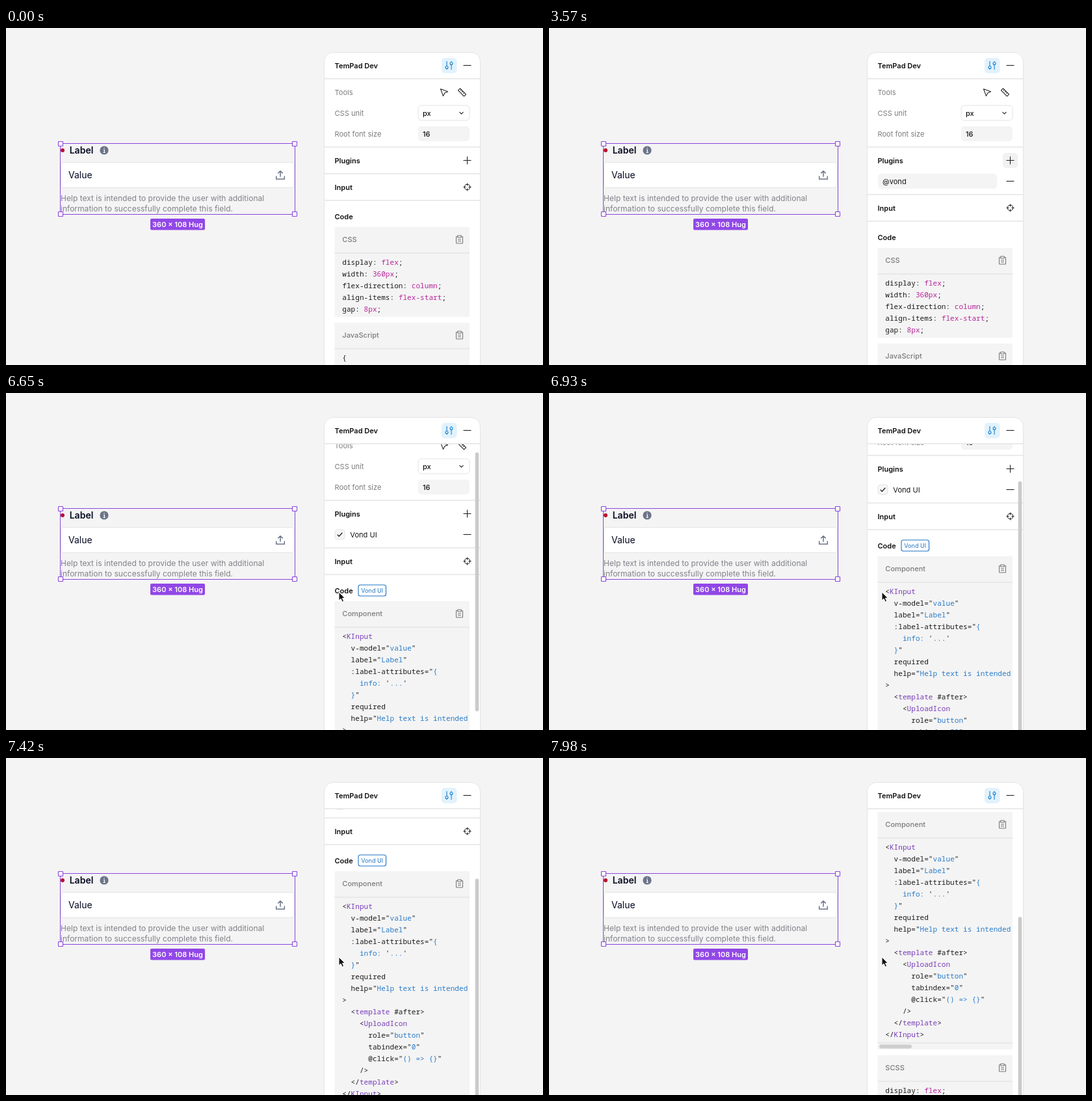
Write an HTML page that moves like this. It is 826 px wide and 518 px high and loops after 8000 ms.

```html
<!DOCTYPE html>
<html lang="en">
<head>
<meta charset="utf-8">
<title>Plugin panel</title>
<style>
html, body { margin: 0; width: 100%; height: 100%; overflow: hidden; background: #f4f4f4; }
svg { display: block; width: 826px; height: 518px; }
text { font: 11px Inter, sans-serif; letter-spacing: .055px; fill: #111; white-space: pre; }
.b { font-weight: 600; letter-spacing: 0; }
.m { font-weight: 500; }
.g { fill: #7b7b7b; }
.code { font: 11px "Roboto Mono", "Noto Sans Mono", monospace; letter-spacing: .055px; fill: #1c1c1c; }
.i { fill: none; stroke: #222; stroke-width: 1.1; stroke-linejoin: round; }
</style>
</head>
<body>
<svg id="stage" viewBox="0 0 826 518" xmlns="http://www.w3.org/2000/svg"></svg>
<script>
const STEP = 70, LOOP = 8000, ROW = 32, PLUGIN = "Vond UI", QUERY = "@vond";
const INKS = { m: "#b7269a", b: "#2b7cc9", p: "#7a3eb8" };

const esc = s => s.replace(/&/g, "&amp;").replace(/</g, "&lt;");
const text = (x, y, s, cls = "", more = "") => `<text x="${x}" y="${y}" class="${cls}" ${more}>${esc(s)}</text>`;
const rect = (x, y, w, h, r, fill, more = "") =>
  `<rect x="${x}" y="${y}" width="${w}" height="${h}" rx="${r}" fill="${fill}" ${more}/>`;
const icon = (x, y, d, more = "") => `<path class="i" transform="translate(${x} ${y})" d="${d}" ${more}/>`;
const rule = (y, x1 = 490, x2 = 729) =>
  `<path d="M${x1} ${y}H${x2}" stroke="#e4e4e4" stroke-width="1.3"/>`;
const minus = y => icon(709.5, y, "M-6 0H6");
const group = (id, body, more = "") => `<g id="${id}" ${more}>${body}</g>`;

// Odd segments between bars are coloured by their first letter.
const codeLine = (y, s) => `<text x="517.3" y="${y}" class="code">` + s.split("|").map((p, i) =>
  i % 2 ? `<tspan fill="${INKS[p[0]]}">${esc(p.slice(1))}</tspan>` : esc(p)).join("") + "</text>";

const CLIP = "M-3 -4.5H-4.2Q-5 -4.5 -5 -3.7V5.2Q-5 6 -4.2 6H4.2Q5 6 5 5.2V-3.7Q5 -4.5 4.2 -4.5H3" +
  "M-2.7 -6H2.7V-3H-2.7ZM-2.5 0H2.5M-2.5 2.8H2.5";

const block = (y, h, title, lines) =>
  rect(505.5, y, 207.5, h, 1, "#f4f4f4") +
  text(517.3, y + 23, title, "m g") +
  icon(697.5, y + 19, CLIP, 'style="stroke:#777"') +
  rule(y + 40, 505.5, 713) +
  `<g clip-path="url(#codeClip)">${lines.map((s, i) => codeLine(y + 57.5 + i * 18, s)).join("")}</g>`;

const css = ["display: |mflex|;", "width: |m360px|;", "flex-direction: |mcolumn|;",
  "align-items: |mflex-start|;", "gap: |m8px|;"];
const markup = ["<|pKInput|", '  v-model="|bvalue|"', '  label="|bLabel|"', '  :label-attributes="|b{|',
  "    |binfo: |'|b...|'", '  |b}|"', "  required",
  '  help="|bHelp text is intended to provide the user|"', ">",
  "  <|ptemplate| #after>", "    <|pUploadIcon|", '      role="|bbutton|"', '      tabindex="|b0|"',
  '      @click="|b() => {}|"', "    />", "  </|ptemplate|>", "</|pKInput|>"];

function canvasSide() {
  const violet = "#8b46dc";
  const handle = (x, y) => rect(x - 3.5, y - 3.5, 7, 7, .5, "#fff", `stroke="${violet}" stroke-width="1.1"`);
  return '<circle cx="87" cy="188" r="3" fill="#b9102f"/>' +
    text(97.7, 193, "Label", "b", 'style="font-size:14px;fill:#060a20"') +
    '<circle cx="151" cy="188" r="6.6" fill="#6c7489"/>' +
    '<path d="M150 187.3h1.3v4M149.6 191.3h3.2M150.4 184.6h1.3" stroke="#fff" stroke-width="1.2" fill="none"/>' +
    rect(84.5, 206.5, 358.5, 39, 4, "#fff", 'stroke="#e1e3e8"') +
    text(96, 231, "Value", "", 'style="font-size:14px;letter-spacing:0;fill:#060a20"') +
    icon(422, 226, "M-6.3 1.5V6.2H6.3V1.5M0 2.8V-6M-3.7 -2.6L0 -6.3L3.7 -2.6", 'style="stroke:#6c7489;stroke-width:1.5"') +
    ["Help text is intended to provide the user with additional",
      "information to successfully complete this field."].map((s, i) =>
      text(84, 266 + i * 16, s, "", 'style="font-size:12px;letter-spacing:.02px;fill:#808289"')).join("") +
    rect(83.5, 177.5, 361, 109, 0, "none", `stroke="${violet}"`) +
    handle(84, 178) + handle(444, 178) + handle(84, 286) + handle(444, 286) +
    rect(222, 293, 84, 17.5, 2, "#9147e6") +
    text(264, 306, "360 × 108 Hug", "b", 'text-anchor="middle" style="fill:#fff"');
}

function settings() {
  return text(505.5, 102.5, "Tools", "g") + text(505.5, 134.5, "CSS unit", "g") +
    text(505.5, 166.5, "Root font size", "g") +
    icon(674, 99, "M-5.5 -5.2L5.6 -1.2L.9 .7L-1.6 5.4Z") +
    icon(701.5, 98.8, "M-3 -6L6 3L3 6L-6 -3ZM-1 -4L-2.6 -2.4M1.2 -1.8L-.4 -.2M3.4 .4L1.8 2") +
    rect(634, 119, 79, 23, 5, "#fff", 'stroke="#e3e3e3"') + text(641, 134.5, "px", "m") +
    icon(700.5, 130.5, "M-3 -1.4L0 1.6L3 -1.4") +
    rect(634, 151, 79, 23, 5, "#f4f4f4") + text(641, 166.5, "16", "m") + rule(183);
}

function plugins() {
  return group("hover", rect(698, 192, 23, 23, 5, "#f1f1f1")) +
    text(505.5, 207.5, "Plugins", "b") + icon(709.5, 203.5, "M-6 0H6M0 -6V6") +
    group("field",
      '<rect id="box" x="506" y="224" width="183.3" height="23" rx="5" fill="#f4f4f4" stroke-width="1.4"/>' +
      text(513, 239.5, "", "", 'id="query"') + rect(0, 229, 1, 13, 0, "#111", 'id="caret"') + minus(235.5)) +
    group("entry",
      rect(506, 228, 15, 15, 4, "#f6f6f6", 'stroke="#e2e2e2"') +
      icon(513.5, 235.5, "M-3.8 .2L-1.2 2.8L3.8 -2.8", 'style="stroke-width:1.3"') +
      text(529.3, 239.5, PLUGIN) + minus(235.5));
}

function lower() {
  return rule(224) + text(505.5, 248.5, "Input", "b") +
    icon(709.5, 244.5, "M-4.2 0A4.2 4.2 0 1 0 4.2 0A4.2 4.2 0 1 0 -4.2 0M-6 0H-2M2 0H6M0 -6V-2M0 2V6") +
    rule(265) + text(505.5, 293.5, "Code", "b") +
    group("plain", block(306, 138, "CSS", css) + block(453, 138, "JavaScript", ["{"])) +
    group("ready",
      rect(542, 281, 42.5, 17, 3, "#fff", 'stroke="#1f74c4" stroke-width="1.1"') +
      text(563.3, 292.8, PLUGIN, "", 'text-anchor="middle" style="font-size:9px;fill:#1f74c4"') +
      block(306, 365, "Component", markup) + rule(661, 505.5, 713) +
      rect(508, 663.5, 50, 6, 3, "#cecece") + block(680, 138, "SCSS", css));
}

const stage = document.getElementById("stage");
stage.innerHTML =
  '<defs><clipPath id="bodyClip"><rect x="489" y="78" width="241" height="440"/></clipPath>' +
  '<clipPath id="codeClip"><rect x="505" y="0" width="208" height="1000"/></clipPath></defs>' +
  rect(0, 0, 826, 518, 0, "#f4f4f4") + canvasSide() +
  rect(489.5, 37.5, 240, 660, 14, "#fff", 'stroke="#e4e4e4"') +
  `<g clip-path="url(#bodyClip)">${group("scroll", settings() + plugins() + group("lower", lower()))}` +
  rect(721.7, 80, 5.6, 398, 2.8, "#cacaca", 'id="thumb"') + "</g>" +
  rule(78) + text(505.5, 61.5, "TemPad Dev", "b") +
  rect(670, 46, 23.5, 23.5, 5, "#e2f2fd") +
  icon(681.5, 57.5, "M-3.5 -6.5V1M-3.5 5V6.5M3.5 -6.5V-5M3.5 -1V6.5" +
    "M-5.5 3A2 2 0 1 0 -1.5 3A2 2 0 1 0 -5.5 3M1.5 -3A2 2 0 1 0 5.5 -3A2 2 0 1 0 1.5 -3", 'style="stroke:#1580cf"') +
  minus(57.5) +
  group("cursor", '<path d="M0 0V13L3 10.2L5.2 15.1L7.5 14.1L5.4 9.3H9.3Z" fill="#111" stroke="#fff" stroke-width="1"/>');

const $ = id => document.getElementById(id);
const el = {};
for (const id of ["hover", "field", "box", "query", "caret", "entry", "lower", "plain", "ready", "scroll", "thumb", "cursor"])
  el[id] = $(id);

const show = (node, on) => node.setAttribute("display", on ? "inline" : "none");
const move = (node, x, y) => node.setAttribute("transform", `translate(${x} ${y})`);
const within = (t, a, b) => t >= a && t < b;

// Smooth curve through [time, value] points, at rest at both ends.
function curve(keys, t) {
  const last = keys.length - 1;
  if (t <= keys[0][0]) return keys[0][1];
  if (t >= keys[last][0]) return keys[last][1];
  const i = keys.findIndex(k => k[0] > t) - 1;
  const slope = n => n <= 0 || n >= last ? 0 :
    (keys[n + 1][1] - keys[n - 1][1]) / (keys[n + 1][0] - keys[n - 1][0]);
  const [t0, a] = keys[i], [t1, b] = keys[i + 1], d = t1 - t0, u = (t - t0) / d;
  const e = u * u * (3 - 2 * u);
  return a + (b - a) * e + d * u * (1 - u) * (slope(i) * (1 - u) - slope(i + 1) * u);
}

const scrollKeys = [[6580, 0], [6650, 18], [6930, 87], [7210, 143], [7420, 164],
  [7560, 200], [7700, 241], [7840, 253], [7980, 255]];
const enterX = [[350, 806], [420, 798], [770, 738], [1050, 716]];
const enterY = [[350, 330], [420, 318], [770, 230], [1050, 204]];
const leaveX = [[5670, 716], [5880, 620], [6090, 484], [6230, 512]];
const leaveY = [[5670, 204], [5880, 262], [6090, 316], [6230, 306]];
const keyTimes = [1680, 2240, 2520, 2730, 2940];

function draw(time) {
  const t = Math.floor(time / STEP) * STEP;
  const open = t >= 1120, loaded = t >= 5250;

  const leaving = t >= 5740;
  const x = curve(leaving ? leaveX : enterX, t), y = curve(leaving ? leaveY : enterY, t);
  show(el.cursor, leaving || within(t, 420, 1680));
  move(el.cursor, x, y);
  show(el.hover, t >= 420 && within(x, 698, 721) && within(y, 192, 215));

  show(el.field, open && !loaded);
  show(el.entry, loaded);
  show(el.plain, !loaded);
  show(el.ready, loaded);
  move(el.lower, 0, open ? ROW : 0);

  el.query.textContent = QUERY.slice(0, keyTimes.filter(k => t >= k).length);
  el.query.style.fill = t >= 3640 ? "#9a9a9a" : "#111";
  el.box.setAttribute("stroke", t >= 3570 ? "none" : "#2d7fca");
  const caretOn = within(t, 1120, 1610) || within(t, 1680, 2170) || within(t, 2240, 3430);
  show(el.caret, caretOn);
  if (caretOn) el.caret.setAttribute("x", 513 + el.query.getComputedTextLength());

  const s = Math.round(curve(scrollKeys, t));
  move(el.scroll, 0, -s);
  move(el.thumb, 0, s * .6456 - .4);
  show(el.thumb, t >= 6230);
}

const start = performance.now();
function tick() {
  draw((performance.now() - start) % LOOP);
  requestAnimationFrame(tick);
}
tick();
</script>
</body>
</html>
```
